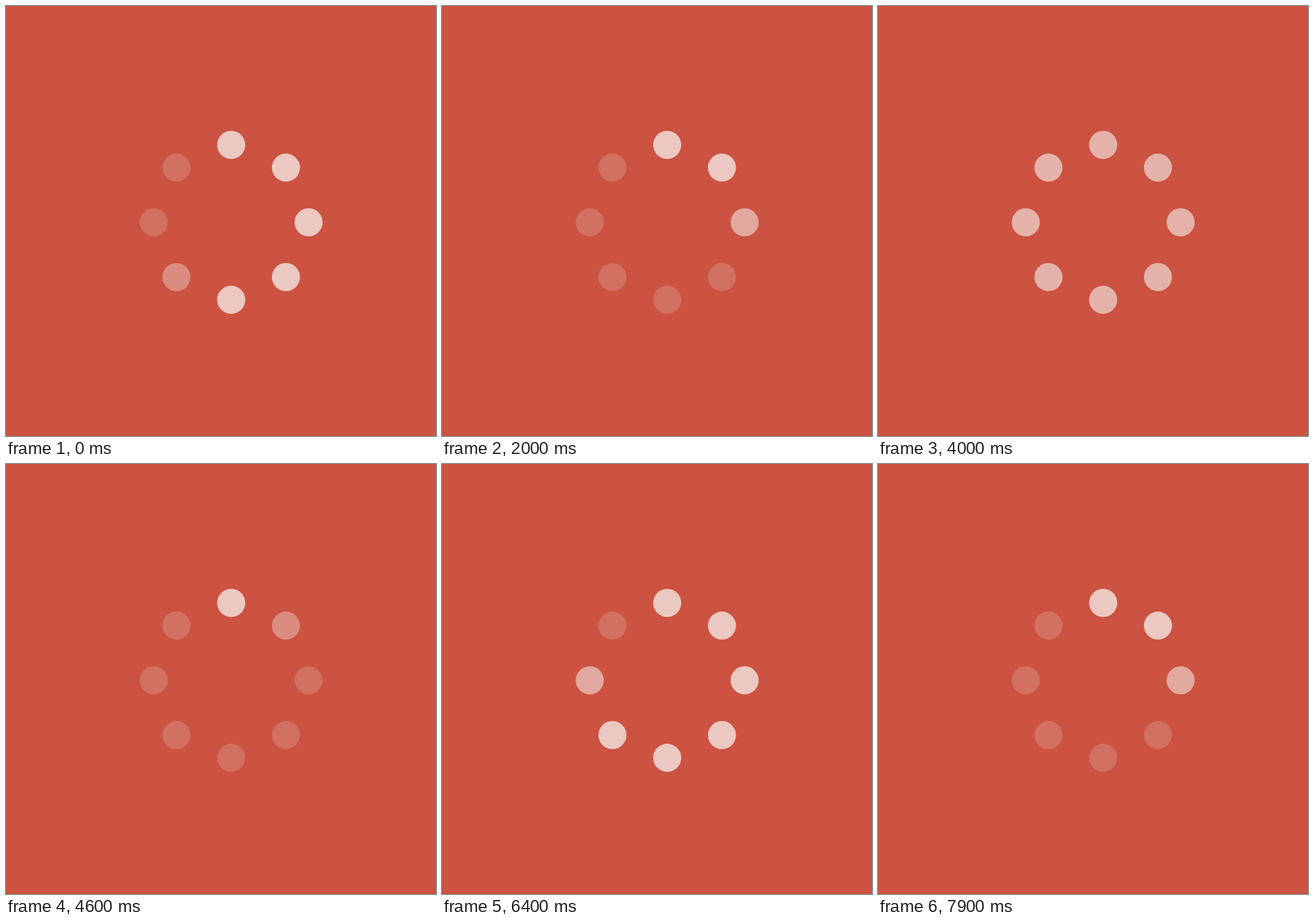
Recreate the animation shown at these times as an HTML page. Size 532x532 px, loop 8000 ms.

```html
<!DOCTYPE html>
<html lang="en">
<head>
<meta charset="utf-8">
<title>Loading ring</title>
<style>
  html, body { margin: 0; width: 100%; height: 100%; overflow: hidden; background: #cc5241; }
  svg { display: block; width: 100%; height: 100%; }
</style>
</head>
<body>
<svg viewBox="0 0 532 532" aria-label="Loading"></svg>
<script>
const LOOP = 8000, STEP = 100;
const DOTS = 8;
const RESET = 0.45; // length of the fade-out, in dot durations
const CYCLE = DOTS + RESET;
const DIM = [210, 112, 97], BRIGHT = [235, 200, 194];

// [time in ms, dots filled since the first cycle began]
const PACE = [
  [0, 5.32], [900, 7.95], [2000, CYCLE + 2.64], [3200, CYCLE + 5.9],
  [4600, 2 * CYCLE + 1.32], [6400, 2 * CYCLE + 6.64], [8000, 3 * CYCLE + 2.94]
];

const svg = document.querySelector('svg');
const dots = Array.from({ length: DOTS }, (_, i) => {
  const angle = i * 2 * Math.PI / DOTS;
  const dot = document.createElementNS('http://www.w3.org/2000/svg', 'circle');
  dot.setAttribute('cx', 278.6 + 95.8 * Math.sin(angle));
  dot.setAttribute('cy', 267.7 - 95.8 * Math.cos(angle));
  dot.setAttribute('r', 17.4);
  return svg.appendChild(dot);
});

const clamp = x => Math.min(1, Math.max(0, x));
const mix = (a, b, k) => a + (b - a) * k;

function progress(t) {
  const i = PACE.findIndex(p => p[0] > t);
  const [t0, v0] = PACE[i - 1], [t1, v1] = PACE[i];
  return mix(v0, v1, (t - t0) / (t1 - t0)) % CYCLE;
}

function draw(t) {
  const filled = progress(t);
  const fade = 1 - clamp((filled - DOTS) / RESET);
  dots.forEach((dot, i) => {
    const k = clamp(filled - i) * fade;
    dot.setAttribute('fill', `rgb(${DIM.map((c, j) => Math.round(mix(c, BRIGHT[j], k)))})`);
  });
}

const start = performance.now();
function tick() {
  const t = (performance.now() - start) % LOOP;
  draw(Math.floor(t / STEP) * STEP);
  requestAnimationFrame(tick);
}
tick();
</script>
</body>
</html>
```
